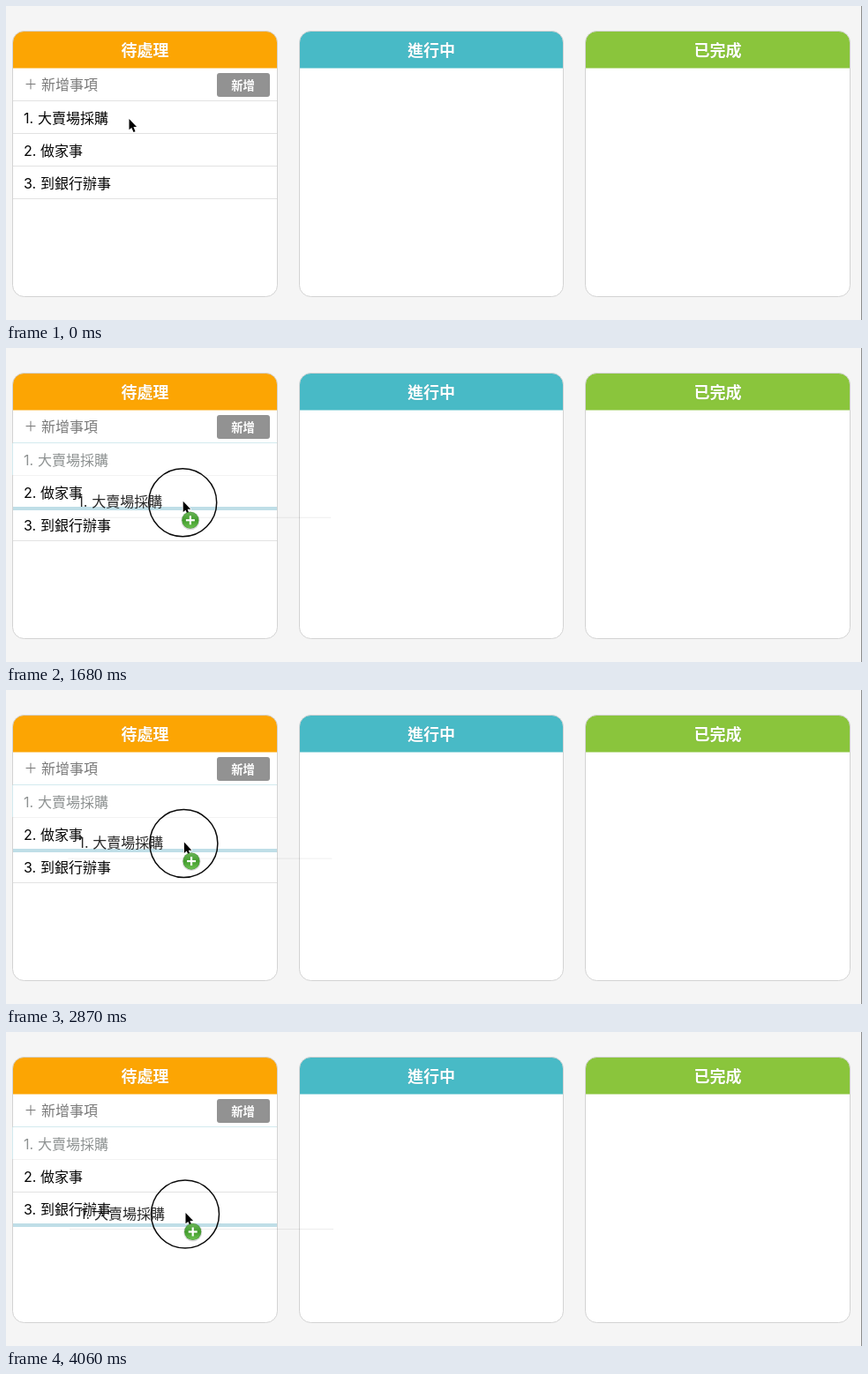
Animation of 970x356 px, one loop 4130 ms. Source, as an HTML page with a canvas:

```html
<!DOCTYPE html>
<html lang="zh-Hant">
<head>
<meta charset="utf-8">
<title>待處理</title>
<style>
html, body { margin: 0; width: 100%; height: 100%; overflow: hidden; background: #f5f5f5; }
canvas { display: block; width: 970px; height: 356px; }
</style>
</head>
<body>
<canvas id="board" width="970" height="356"></canvas>
<script>
const ctx = document.getElementById('board').getContext('2d');
const LOOP = 4130, STEP = 70, PRESS = 140, DRAG = 280;
const CJK = '"Noto Sans CJK TC", "Noto Sans CJK", sans-serif';
const LATIN = 'Inter, "Noto Sans CJK TC", sans-serif';
const TOP = 107, ROW = 37, FIRST = 126.5;

const titles = ['待處理', '進行中', '已完成'];
const colors = ['#fca503', '#48bac6', '#8ac53c'];
const items = ['大賣場採購', '做家事', '到銀行辦事'];

// Turning points of the pointer's height: time, y
const turns = [
  [0, 129.5], [140, 127], [490, 157], [630, 146.5], [1330, 177.5],
  [2030, 173], [2240, 173], [2590, 148], [3220, 210.5], [3920, 206.5]
];

// Smooth 0..1 between two times
function ease(t, from, to) {
  const p = Math.min(1, Math.max(0, (t - from) / (to - from)));
  return p * p * (3 - 2 * p);
}

function pointerAt(t) {
  const x = 139 + 59.5 * ease(t, 140, 560) + 1.7 * ease(t, 630, 1330) + 2.8 * ease(t, 2590, 3220);
  let y = turns[0][1];
  for (let i = 1; i < turns.length; i++) {
    const [t0, y0] = turns[i - 1], [t1, y1] = turns[i];
    y += (y1 - y0) * ease(t, t0, t1);
  }
  return { x, y };
}

function text(str, x, y, font, color, align = 'left') {
  ctx.font = font;
  ctx.fillStyle = color;
  ctx.textAlign = align;
  ctx.fillText(str, x, y);
}

function rect(x, y, w, h, color) {
  ctx.fillStyle = color;
  ctx.fillRect(x, y, w, h);
}

function disc(x, y, r, fill) {
  ctx.beginPath();
  ctx.arc(x, y, r, 0, Math.PI * 2);
  ctx.fillStyle = fill;
  ctx.fill();
}

function label(i, dx, y, color) {
  text(`${i + 1}.`, 20 + dx, y + 6, '16px ' + LATIN, color);
  text(items[i], (i ? 39 : 36) + dx, y + 6, '16px ' + CJK, color);
}

function drawColumn(title, i) {
  const left = Math.round(i * 324.5) + 7.5;
  const w = Math.floor(i * 324.5) + 307.5 - left;
  ctx.save();
  ctx.beginPath();
  ctx.roundRect(left, 28.5, w, 301, 13);
  ctx.fillStyle = '#fff';
  ctx.fill();
  ctx.save();
  ctx.clip();
  rect(left, 28, w, 42.5, colors[i]);
  ctx.restore();
  ctx.strokeStyle = '#d3d3d3';
  ctx.lineWidth = 1;
  ctx.stroke();
  ctx.shadowColor = 'rgba(0,0,0,.15)';
  ctx.shadowBlur = 1;
  ctx.shadowOffsetY = 0.5;
  text(title, left + w / 2, 56.5, 'bold 18px ' + CJK, '#fff', 'center');
  ctx.restore();
}

function drawList(dragging, slot) {
  text('＋', 20.5, 93.5, '15px ' + CJK, '#7a7a7a');
  text('新增事項', 40, 94.5, '16px ' + CJK, '#7a7a7a');
  ctx.beginPath();
  ctx.roundRect(239, 76, 60, 27, 3);
  ctx.fillStyle = '#929292';
  ctx.fill();
  text('新增', 268.5, 94.5, 'bold 13.33px ' + CJK, '#fff', 'center');

  for (let i = 0; i < 4; i++) rect(8, TOP + i * ROW, 299, 1, dragging && i === 1 ? '#f2f2f2' : '#e2e2e2');
  if (dragging) {
    rect(8, TOP, 299, 1, '#d3eaee');
    rect(7, TOP + 1, 1, ROW - 1, '#d3eaee');
  }
  items.forEach((item, i) => label(i, 0, FIRST + i * ROW, dragging && i === 0 ? '#8e9292' : '#050505'));
  if (dragging) rect(8, TOP - 1 + (slot + 1) * ROW, 299, 4, '#bfdee7');
}

function drawArrow(x, y) {
  ctx.save();
  ctx.translate(x, y);
  ctx.scale(0.95, 0.95);
  const shape = new Path2D('M0 0V13L3 10.4L5.3 15.8L7.4 14.9L5.2 9.6H9Z');
  ctx.strokeStyle = '#fff';
  ctx.lineWidth = 1.8;
  ctx.lineJoin = 'round';
  ctx.stroke(shape);
  ctx.fillStyle = '#000';
  ctx.fill(shape);
  ctx.restore();
}

function drawBadge(x, y) {
  const g = ctx.createLinearGradient(0, y - 9, 0, y + 9);
  g.addColorStop(0, '#6bb558');
  g.addColorStop(0.5, '#429c2d');
  g.addColorStop(1, '#6cc150');
  disc(x, y + 0.5, 10.5, 'rgba(0,0,0,.15)');
  disc(x, y, 9.6, '#4a9a3a');
  disc(x, y, 9, g);
  rect(x - 5, y - 1.1, 10, 2.2, '#fff');
  rect(x - 1.1, y - 5, 2.2, 10, '#fff');
}

function draw(t) {
  const { x, y } = pointerAt(t);
  const dragging = t >= DRAG;
  const slot = Math.max(0, Math.floor((y - FIRST) / ROW));

  rect(0, 0, 970, 356, '#f5f5f5');
  rect(969, 0, 1, 356, '#8c8c8c');
  titles.forEach(drawColumn);
  drawList(dragging, slot);

  if (dragging) {
    const dx = x - 139, dy = y - 127.5;
    label(0, dx, FIRST + dy, 'rgba(10,10,10,.88)');
    rect(8 + dx, 144 + dy, 299, 1, 'rgba(0,0,0,.07)');
  }
  if (t >= PRESS) {
    ctx.beginPath();
    ctx.arc(x, y, 38.5, 0, Math.PI * 2);
    ctx.strokeStyle = '#0a0a0a';
    ctx.lineWidth = 1.5;
    ctx.stroke();
  }
  drawArrow(x + 0.5, y - 1.5);
  if (dragging) drawBadge(x + 8.7, y + 20);
}

const start = performance.now();
function tick() {
  const t = (performance.now() - start) % LOOP;
  draw(Math.floor(t / STEP) * STEP);
  requestAnimationFrame(tick);
}
tick();
</script>
</body>
</html>
```
